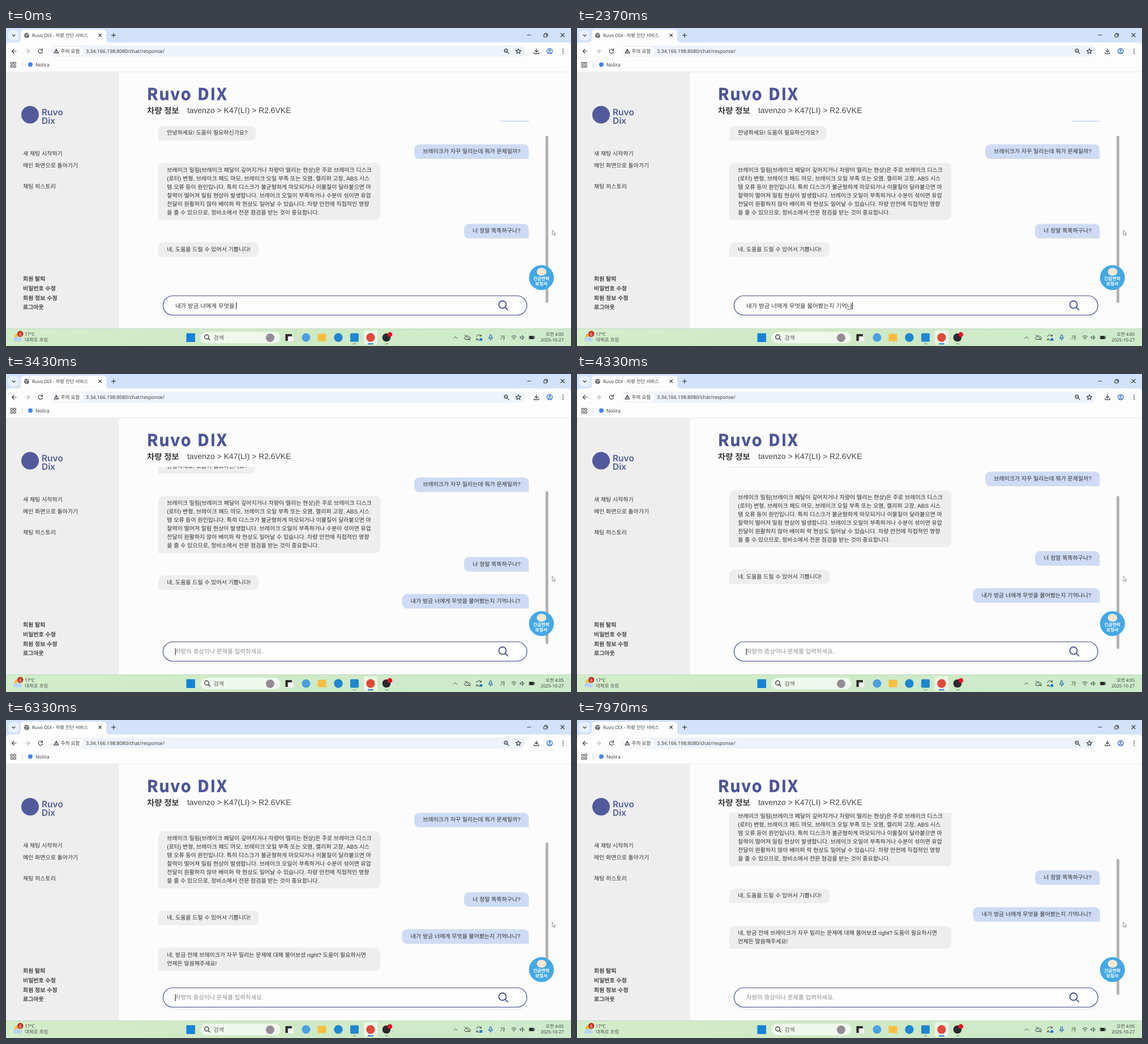
These frames come from a looping animation (998 px wide and 561 px high, 8 s). An HTML page:

```html
<!DOCTYPE html>
<html lang="ko">
<head>
<meta charset="utf-8">
<title>Ruvo DIX</title>
<style>
  html, body { margin: 0; width: 100%; height: 100%; overflow: hidden; background: #fcfcfc; }
  svg { display: block; width: 100vw; height: 100vh; }
  text { white-space: pre; text-rendering: geometricPrecision; }
  .ui { font-family: "Noto Sans", "Noto Sans CJK KR", sans-serif; font-size: 8.7px; fill: #3c3c3c; }
  .web { font-family: "Liberation Sans", "Noto Sans CJK KR", sans-serif; font-size: 9.98px; fill: #303030; }
  .kr { font-family: "Noto Sans CJK KR", "Noto Sans", sans-serif; }
  .field { font-size: 10.45px; }
  .medium { stroke: #303030; stroke-width: .25; }
  .line { fill: none; stroke: #3c4043; stroke-width: 1.2; stroke-linecap: round; stroke-linejoin: round; }
</style>
</head>
<body>
<svg viewBox="0 0 998 561" preserveAspectRatio="none">
  <defs>
    <clipPath id="view"><rect x="205" y="163.6" width="745" height="321"/></clipPath>
    <linearGradient id="bar">
      <stop offset="0" stop-color="#d3edcb"/>
      <stop offset=".5" stop-color="#cfe9c6"/>
      <stop offset="1" stop-color="#cdebcb"/>
    </linearGradient>
    <filter id="soft" x="-5%" y="-30%" width="110%" height="180%">
      <feDropShadow dx="0" dy="2" stdDeviation="2.5" flood-color="#4c5594" flood-opacity=".14"/>
    </filter>
  </defs>
  <rect width="998" height="561" fill="#fcfcfc"/>

  <!-- browser frame -->
  <g class="ui">
    <rect width="998" height="30" fill="#d3e2fb"/>
    <rect x="4" y="4" width="18.5" height="18" rx="6" fill="#e9f1fe"/>
    <path class="line" d="M11 12l2.5 2.5 2.5-2.5"/>
    <path d="M0 32Q0 25.500 7 25.500H20Q26 25.500 26 19.500V9Q26 3 32 3H171Q177 3 177 9V19.500Q177 25.500 183 25.500H991Q998 25.500 998 32V78H0z" fill="#fdfdfd"/>
    <circle cx="36.500" cy="13" r="4.500" fill="#5f6368"/>
    <path d="M33 11.500l3 .5 1 2-2 2M38 9.500l-.5 1.500 3 1.500" fill="none" stroke="#fff" stroke-width="1"/>
    <text x="46" y="16.300" style="font-size:8.2px">Ruvo DIX - 차량 진단 서비스</text>
    <path class="line" d="M164 10.500l4.500 4.500m0-4.500l-4.500 4.500M186.500 12.800h7m-3.500-3.500v7"/>
    <g class="line">
      <path d="M921 12.500h6M980 9.500l6 6m0-6l-6 6"/>
      <rect x="950" y="11" width="5" height="5" rx="1"/>
      <path d="M951.500 9.500h4q1 0 1 1v4"/>
    </g>
    <path class="line" d="M18 41h-7.500m3.500-3.500l-3.500 3.500 3.500 3.500"/>
    <path class="line" style="stroke:#b4b7ba" d="M34 41h7.500m-3.500-3.500l3.500 3.500-3.500 3.500"/>
    <path class="line" d="M64 38.800a3.700 3.700 0 1 0 .6 3M64.500 36.800v2.500h-2.500"/>
    <rect x="79" y="31" width="838" height="19.500" rx="9.750" fill="#edf2fb"/>
    <rect x="81" y="33" width="55.500" height="15.500" rx="7.750" fill="#fdfdfd"/>
    <path class="line" d="M88.800 37.200l4 7h-8zM88.800 39.800v2M88.800 43v.1"/>
    <text x="96.500" y="43.800" style="font-size:8.600px">주의 요함</text>
    <text x="141.300" y="44">3.34.166.198:8080/chat/response/</text>
    <g class="line">
      <circle cx="883" cy="40" r="2.900"/><path d="M885.300 42.300l2.700 2.700M881.800 40h2.400"/>
      <path d="M905 36.500l1.300 2.900 3.200.3-2.400 2.100.7 3.200-2.800-1.700-2.800 1.700.7-3.200-2.400-2.100 3.200-.3z"/>
      <path d="M937 36.500v6m-2.700-2.500l2.700 2.700 2.700-2.700M933 43v2.300h8V43"/>
    </g>
    <g class="line" style="stroke:#1a5fc4">
      <circle cx="960.300" cy="40.800" r="4.700"/><circle cx="960.300" cy="39.500" r="1.500"/><path d="M957.500 44q2.800-2 5.600 0"/>
    </g>
    <g fill="#3c4043"><circle cx="984" cy="37.500" r="1"/><circle cx="984" cy="41" r="1"/><circle cx="984" cy="44.500" r="1"/></g>
    <path class="line" style="stroke-width:1" d="M8.500 60.500h3.300v3.300h-3.300zM14 60.500h3.300v3.300h-3.300zM8.500 66h3.300v3.300h-3.300zM14 66h3.300v3.300h-3.300z"/>
    <path d="M28.500 60v10" stroke="#c9d6ec"/>
    <circle cx="43" cy="64.600" r="4" fill="#4285f4"/>
    <text x="52" y="67.600">Nolira</text>
    <path d="M0 77.500h998" stroke="#e8e9ea"/>
  </g>

  <!-- sidebar -->
  <rect y="78" width="199.500" height="452" fill="#eeeeee"/>
  <circle cx="42.500" cy="153" r="15.500" fill="#515b9b"/>
  <g font-family="Inter, sans-serif" font-size="15.500" font-weight="600" fill="#515b9b">
    <text x="63" y="154">Ruvo</text><text x="63" y="169">Dix</text>
  </g>
  <g id="menu" class="web"></g>

  <!-- page head -->
  <text class="kr" x="249" y="127" font-size="28.600" font-weight="700" letter-spacing="1.900" fill="#4c5594" stroke="#4c5594" stroke-width=".6">Ruvo DIX</text>
  <text class="kr" x="249" y="150.500" font-size="14.300" font-weight="700" fill="#3a3a3a">차량 정보</text>
  <text class="web" x="320" y="150.300" style="font-size:13.930px;fill:#444">tavenzo &gt; K47(LI) &gt; R2.6VKE</text>

  <g clip-path="url(#view)"><g id="chat" class="web"></g></g>
  <rect id="thumb" x="953" width="5" rx="2.500" fill="#b3b3b3"/>

  <!-- input -->
  <rect x="277.500" y="472.500" width="642.500" height="34" rx="17" fill="#fdfdfd" stroke="#4c5594" stroke-width="1.200" filter="url(#soft)"/>
  <text id="hint" class="web field" x="299" y="493" style="fill:#8e8e8e">차량의 증상이나 문제를 입력하세요.</text>
  <text id="typed" class="web field" x="299" y="493.800"></text>
  <rect id="mark" y="495.500" height=".8" fill="#333"/>
  <rect id="caret" y="484" width="1" height="12" fill="#111"/>
  <g fill="none" stroke="#4c5594" stroke-width="1.900" stroke-linecap="round"><circle cx="877" cy="488" r="6.500"/><path d="M882 493l4.300 4.300"/></g>

  <!-- emergency button -->
  <circle cx="945.800" cy="440.300" r="22" fill="#43a8e5"/>
  <ellipse cx="946" cy="430" rx="8.500" ry="7" fill="#f6e6cf"/>
  <g class="kr" font-size="7.850" font-weight="700" fill="#fff" text-anchor="middle">
    <text x="945.600" y="444.800">긴급연락</text><text x="945.600" y="454">보험사</text>
  </g>

  <!-- taskbar -->
  <g class="ui">
    <rect y="530" width="998" height="31" fill="url(#bar)"/>
    <path d="M0 530.500h998" stroke="#c3d8c0"/>
    <circle cx="20" cy="544" r="5" fill="#f6b73c"/>
    <path d="M16 553a3.500 3.500 0 0 1 .5-7 5 5 0 0 1 8.500 1 3 3 0 0 1 .5 6z" fill="#b9d3f3"/>
    <circle cx="25.300" cy="539.500" r="5.200" fill="#c42b1c"/>
    <text x="25.300" y="542.500" text-anchor="middle" style="font-size:8px;fill:#fff">6</text>
    <text x="33" y="543.300" style="font-size:8px">17°C</text>
    <text x="33" y="553.300" style="font-size:8.500px;fill:#555">대체로 흐림</text>
    <rect x="318.500" y="538.500" width="15.500" height="15.500" fill="#1583d8"/>
    <rect x="343.500" y="536" width="141" height="20" rx="10" fill="#f0f8ed"/>
    <g class="line" style="stroke-width:1.400"><circle cx="354.500" cy="545" r="3.700"/><path d="M357.200 547.800l2.800 2.800"/></g>
    <text x="366.500" y="549.700" style="font-size:10px;fill:#5a5a5a">검색</text>
    <circle cx="466.500" cy="546.500" r="7.500" fill="#958b98"/>
    <rect x="493.500" y="540" width="11.500" height="12" rx="1" fill="#2c2c2c"/>
    <rect x="498" y="544" width="10.500" height="9.500" rx="1" fill="#f4f4f4" stroke="#bbb" stroke-width=".5"/>
    <circle cx="530" cy="546" r="7.500" fill="#4b9fe0"/>
    <rect x="550.500" y="539.500" width="15" height="13" rx="1.500" fill="#f5bf3d"/>
    <circle cx="587" cy="546" r="7.700" fill="#1f86cf"/>
    <rect x="608" y="538.500" width="15" height="15" rx="2" fill="#1f87cf"/>
    <rect x="632" y="533.500" width="24" height="25" rx="3" fill="#eaf6e6"/>
    <circle cx="644" cy="546" r="7.700" fill="#de4a3c"/>
    <circle cx="672" cy="546" r="7.300" fill="#2b2930"/>
    <circle cx="678" cy="540.800" r="4.300" fill="#e81123"/>
    <path d="M640 557.300h8" stroke="#1678c8" stroke-width="2" stroke-linecap="round"/>
    <path d="M613.500 557.300h4M670.500 557.300h4" stroke="#8b968a" stroke-width="1.600" stroke-linecap="round"/>
    <g class="line" style="stroke-width:1">
      <path d="M791 547.500l3-3 3 3"/>
      <path d="M812 549.500h6a2.200 2.200 0 0 0 0-4.500 3.600 3.600 0 0 0-6.500 0 2.300 2.300 0 0 0 .5 4.500zM810.500 541.500l9.500 9"/>
      <path d="M831 544.500a4.500 4.500 0 0 1 8-1.500m.5-2v2.500h-2.500M839.500 547.500a4.500 4.500 0 0 1-8 1.500m-.5 2v-2.500h2.500"/>
      <path d="M893 544.500q4.200-3.800 8.400 0M894.700 546.500q2.500-2.200 5 0M896.300 548.500q.9-.6 1.800 0"/>
      <path d="M908.500 544.800h1.700l2.300-2.300v7l-2.300-2.300h-1.700zM914.500 544.500q1.200 1.500 0 3"/>
      <path d="M924.500 543.500h8v5h-8zM933.800 545v2"/>
    </g>
    <circle cx="839" cy="549.500" r="2.500" fill="#1a78d0"/>
    <rect x="925" y="544" width="6.500" height="4" fill="#222"/>
    <g class="line" style="stroke:#2a6fb5"><rect x="854.500" y="541" width="3" height="6" rx="1.500"/><path d="M852.800 545.500q0 3.500 3.200 3.500t3.200-3.500M856 549v2"/></g>
    <text x="877" y="549.500" text-anchor="middle" style="font-size:10px">가</text>
    <g text-anchor="end" style="font-size:7.850px"><text x="985.300" y="543.300">오전 4:05</text><text x="985.300" y="553.300">2025-10-27</text></g>
  </g>

  <path d="M965 356.500v8.700l2-1.800 1.400 3 1.300-.6-1.400-2.900h2.600z" fill="#fff" stroke="#666" stroke-width=".7"/>
</svg>
<script>
const $ = id => document.getElementById(id);
const LOOP = 8000, SENT = 3200, REPLY = 6200;
const RIGHT = 923.5, LEFT = 269, WIDE = 392.5;

const make = (parent, tag, attrs, text = "") => {
  const el = document.createElementNS("http://www.w3.org/2000/svg", tag);
  for (const k in attrs) el.setAttribute(k, attrs[k]);
  el.textContent = text;
  return parent.appendChild(el);
};

const menu = [
  [224.5, "새 채팅 시작하기"], [246, "메인 화면으로 돌아가기"], [282.5, "채팅 히스토리"],
  [446, "회원 탈퇴"], [463, "비밀번호 수정"], [479.7, "회원 정보 수정"], [496.2, "로그아웃"]
];
menu.forEach(([y, s], i) => make($("menu"), "text", { x: 30, y, class: i > 2 ? "medium" : "" }, s));

// Bubble with one square bottom corner on the speaker's side
function bubble(top, w, mine, ...lines) {
  const g = make($("chat"), "g", {});
  const h = 10.7 + 15 * lines.length, r = 10;
  const x = mine ? RIGHT - w : LEFT, bl = mine ? r : 0, br = mine ? 0 : r;
  const d = `M${x + r} ${top}h${w - 2 * r}q${r} 0 ${r} ${r}v${h - r - br}q0 ${br} ${-br} ${br}` +
    `h${bl + br - w}q${-bl} 0 ${-bl} ${-bl}V${top + r}q0 ${-r} ${r} ${-r}z`;
  make(g, "path", { d, fill: mine ? "#cfdbf4" : "#eeeeee" });
  lines.forEach((s, i) => make(g, "text", { x: x + 15.3, y: top + 15.8 + 15 * i }, s));
  return g;
}

const question = "내가 방금 너에게 무엇을 ";
bubble(139.7, 55, true, "");
bubble(172.5, 172, false, "안녕하세요! 도움이 필요하신가요?");
bubble(205.3, 202.5, true, "브레이크가 자꾸 밀리는데 뭐가 문제일까?");
bubble(238, WIDE, false,
  "브레이크 밀림(브레이크 페달이 깊어지거나 차량이 떨리는 현상)은 주로 브레이크 디스크",
  "(로터) 변형, 브레이크 패드 마모, 브레이크 오일 부족 또는 오염, 캘리퍼 고장, ABS 시스",
  "템 오류 등이 원인입니다. 특히 디스크가 불균형하게 마모되거나 이물질이 달라붙으면 마",
  "찰력이 떨어져 밀림 현상이 발생합니다. 브레이크 오일이 부족하거나 수분이 섞이면 유압",
  "전달이 원활하지 않아 베이퍼 락 현상도 일어날 수 있습니다. 차량 안전에 직접적인 영향",
  "을 줄 수 있으므로, 정비소에서 전문 점검을 받는 것이 중요합니다.");
bubble(345.5, 114.5, true, "너 정말 똑똑하구나?");
bubble(378, 177.5, false, "네, 도움을 드릴 수 있어서 기쁩니다!");
const asked = bubble(410.8, 224, true, question + "물어봤는지 기억나니?");
const answer = bubble(443.5, WIDE, false,
  "네, 방금 전에 브레이크가 자꾸 밀리는 문제에 대해 물어보셨 right? 도움이 필요하시면",
  "언제든 말씀해주세요!");

// Keystrokes: a settled prefix, then each form of the syllable being composed
const keys = [
  ["", "ㅁ무물"], ["물", "ㅇ어업"], ["물어", "보봐봤"], ["물어봤", "ㄴ느는늕"], ["물어봤는", "지"],
  ["물어봤는지", " "], ["물어봤는지 ", "ㄱ기깅"], ["물어봤는지 기", "어억"],
  ["물어봤는지 기억", "ㄴ나난"], ["물어봤는지 기억나", "니"], ["물어봤는지 기억나니", "?"]
].flatMap(([head, forms]) => [...forms].map(c => head + c));
const KEY_START = 130, KEY_STEP = 105;

const ease = (t, start, span) => {
  const p = Math.min(1, Math.max(0, (t - start) / span));
  return p * p * (3 - 2 * p);
};
const show = (el, on) => el.setAttribute("visibility", on ? "visible" : "hidden");
const set = (el, attrs) => { for (const k in attrs) el.setAttribute(k, attrs[k]); };

function draw(t) {
  const sent = t >= SENT, replied = t >= REPLY;
  const a = ease(t, SENT + 30, 320), b = ease(t, REPLY + 30, 370);
  $("chat").setAttribute("transform", `translate(0 ${-33 * a - 47.5 * b})`);
  show(asked, sent);
  show(answer, replied);
  const [y, height] = replied ? [209.5 + 35.5 * b, 240] : sent ? [188 + 27 * a, 270] : [190, 295];
  set($("thumb"), { y, height });

  const n = Math.min(keys.length - 1, Math.floor((t - KEY_START) / KEY_STEP));
  const value = sent ? "" : question + (keys[n] || "");
  const typed = $("typed");
  if (typed.textContent !== value) typed.textContent = value;
  const end = 299 + (value ? typed.getComputedTextLength() : 0);
  show($("hint"), sent);
  show($("mark"), /[ㄱ-힣]$/.test(value));
  set($("mark"), { x: end - 9.6, width: 9.6 });

  const lastKey = sent ? SENT : n < 0 ? 0 : KEY_START + n * KEY_STEP;
  set($("caret"), { x: end - .3 });
  show($("caret"), (t - lastKey) % 1000 < 500);
}

const begin = performance.now();
function tick() {
  draw((performance.now() - begin) % LOOP);
  requestAnimationFrame(tick);
}
tick();
</script>
</body>
</html>
```
